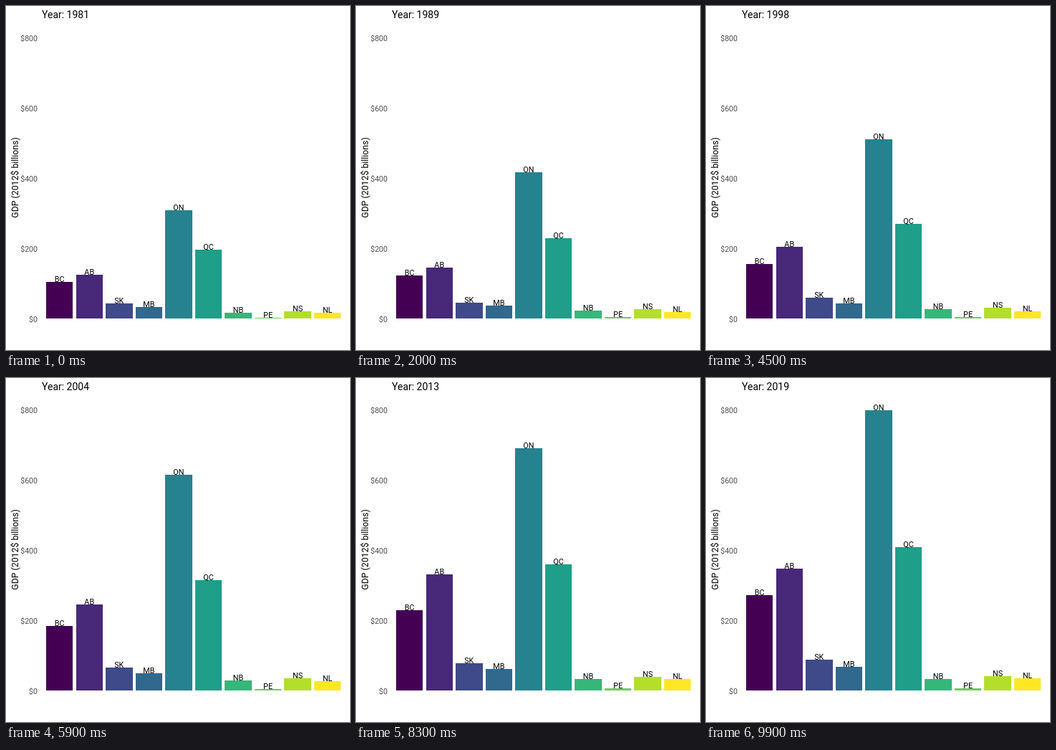
Recreate the animation shown at these times as an HTML page with a canvas. Size 480 by 480 pixels, loop 10000 ms.

```html
<!DOCTYPE html>
<html lang="en">
<head>
<meta charset="utf-8">
<title>GDP by province</title>
<style>
  html, body { margin: 0; width: 100%; height: 100%; overflow: hidden; background: #fff; }
  canvas { display: block; }
</style>
</head>
<body>
<canvas id="chart" width="480" height="480"></canvas>
<script>
const ctx = document.getElementById('chart').getContext('2d', { alpha: false });
const FRAMES = 100, FRAME_MS = 100;
const ZERO = 436.5, SCALE = 0.49, LEFT = 56, PITCH = 41.55, WIDTH = 37.4;

// Turning points of the economy; rows with five values use every second one.
const YEARS = [1981, 1982, 1989, 1993, 1998, 2004, 2008, 2013, 2019];
const FIRST = YEARS[0], LAST = YEARS[YEARS.length - 1];

// Name, colour, billions of dollars at the turning points.
const bars = [
  ['BC', '#440154', 105, 99, 125, 136, 154.5, 187, 209, 230, 272],
  ['AB', '#482878', 125.5, 121, 147.5, 165, 203, 249, 278, 333, 348],
  ['SK', '#3e4a89', 44, 46, 59, 72.5, 88],
  ['MB', '#31688e', 33.5, 38, 44, 56, 68],
  ['ON', '#26828e', 308.5, 299, 423, 407, 505, 622, 649, 691, 799],
  ['QC', '#1f9e89', 197, 190, 232, 232, 268, 317.5, 341, 361, 409],
  ['NB', '#35b779', 17, 23.3, 27.3, 33, 34.3],
  ['PE', '#6dcd59', 3, 4.3, 4.5, 5.8, 6.9],
  ['NS', '#b4de2c', 21.5, 27.7, 31.3, 38, 42],
  ['NL', '#fde725', 17, 19.2, 20.8, 33.5, 35.5]
];

function valueAt(year, values) {
  const step = (YEARS.length - 1) / (values.length - 1);
  let i = 0;
  while (i < values.length - 2 && year > YEARS[(i + 1) * step]) i++;
  const from = YEARS[i * step], to = YEARS[(i + 1) * step];
  return values[i] + (values[i + 1] - values[i]) * (year - from) / (to - from);
}

function text(str, x, y, size, align, color = '#000') {
  ctx.font = `${size}px Roboto, sans-serif`;
  ctx.textAlign = align;
  ctx.fillStyle = color;
  ctx.fillText(str, x, y);
}

function drawAxis() {
  for (let v = 0; v <= 800; v += 200) {
    text('$' + v, 44, Math.round(441 - v * SCALE), 10.6, 'right', '#4d4d4d');
  }
  ctx.save();
  ctx.translate(17, 239.5);
  ctx.rotate(-Math.PI / 2);
  text('GDP (2012$ billions)', 0, 0, 12.3, 'center');
  ctx.restore();
}

function draw(frame) {
  const year = FIRST + (LAST - FIRST) * frame / (FRAMES - 1);
  ctx.fillStyle = '#fff';
  ctx.fillRect(0, 0, 480, 480);
  drawAxis();
  text('Year: ' + Math.round(year), 50, 17, 14, 'left');
  bars.forEach(([name, color, ...values], i) => {
    const x = LEFT + i * PITCH, left = Math.round(x), right = Math.round(x + WIDTH);
    const top = Math.round(ZERO - valueAt(year, values) * SCALE);
    ctx.fillStyle = color;
    ctx.fillRect(left, top, right - left, 436 - top);
    text(name, x + WIDTH / 2, top, 10.8, 'center');
  });
}

const start = performance.now();
function tick() {
  draw(Math.floor((performance.now() - start) / FRAME_MS) % FRAMES);
  requestAnimationFrame(tick);
}
tick();
</script>
</body>
</html>
```
